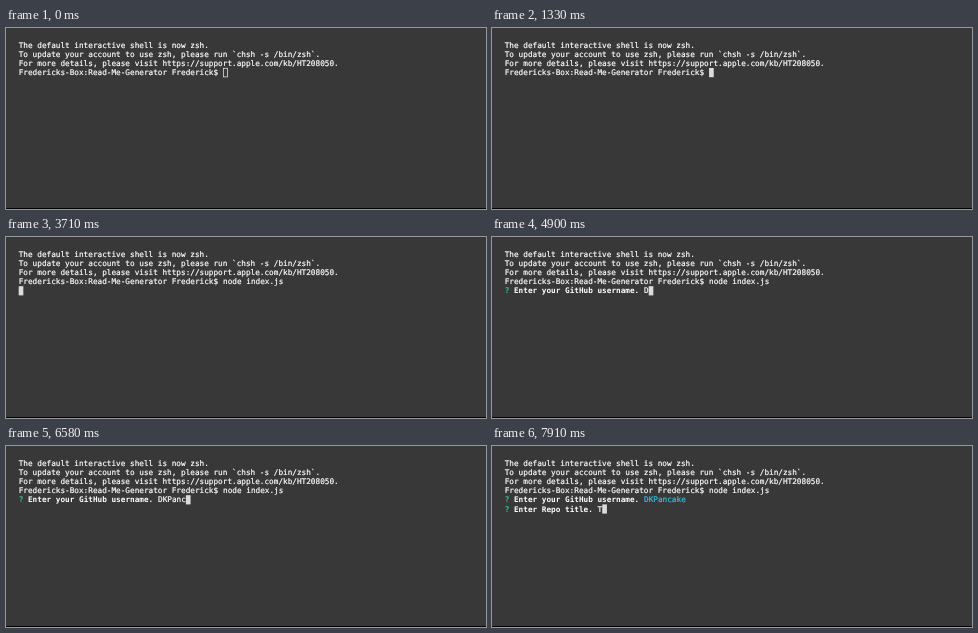
Animation of 480 by 181 pixels, one loop 8 s. Source, as an HTML page:

```html
<!DOCTYPE html>
<html lang="en">
<head>
<meta charset="utf-8">
<title>Terminal session</title>
<style>
  html, body { margin: 0; width: 100%; height: 100%; overflow: hidden; background: #383838; }
  svg { display: block; width: 480px; height: 181px; }
  text {
    font: 7.715px "DejaVu Sans Mono", monospace;
    fill: #fff;
    stroke: #fff;
    stroke-width: .2px;
    white-space: pre;
    text-rendering: geometricPrecision;
  }
  .mark { fill: #2cc9a0; stroke: #2cc9a0; }
  .ask { font-weight: bold; stroke: none; }
  .done { fill: #35bfe0; stroke: #35bfe0; }
</style>
</head>
<body>
<svg viewBox="0 0 480 181">
  <rect width="480" height="181" fill="#383838"/>
  <rect y="180" width="480" height="1" fill="#000"/>
  <g id="screen"></g>
  <rect id="cursor" stroke-width=".8"/>
</svg>
<script>
  const LOOP = 8000, LEFT = 12.7, CELL = 4.645, TOP = 19.6, LINE = 9.2;
  const PROMPT = 'Fredericks-Box:Read-Me-Generator Frederick$ ';
  const COMMAND = 'node index.js ';
  const ASK_USER = 'Enter your GitHub username.';
  const ASK_TITLE = 'Enter Repo title.';
  const USER = 'DKPancake';

  const FOCUS = 560, RUN = 3710, SHOW_USER = 4060, SUBMIT = 7280, SHOW_TITLE = 7350;
  // Key times; the last command key completes the file name.
  const commandKeys = [1400, 1470, 1540, 1820, 2800, 2940, 3010, 3080, 3290];
  const userKeys = [4900, 5250, 5670, 6090, 6300, 6580, 6720, 6930, 7070];
  const titleKeys = [7910];

  const svgNode = (name, parent) =>
    parent.appendChild(document.createElementNS('http://www.w3.org/2000/svg', name));
  const screen = document.getElementById('screen');
  const cursor = document.getElementById('cursor');

  function addText(row, col, content = '', style = '') {
    const node = svgNode('text', screen);
    node.setAttribute('x', LEFT + col * CELL);
    node.setAttribute('y', TOP + row * LINE);
    node.setAttribute('class', style);
    node.textContent = content;
    return node;
  }

  function addQuestion(row, question) {
    return [addText(row, 0, '?', 'mark'), addText(row, 2, question, 'ask')];
  }

  [
    'The default interactive shell is now zsh.',
    'To update your account to use zsh, please run `chsh -s /bin/zsh`.',
    'For more details, please visit https://support.apple.com/kb/HT208050.',
    PROMPT
  ].forEach((line, row) => addText(row, 0, line));

  const userCol = ASK_USER.length + 3, titleCol = ASK_TITLE.length + 3;
  const command = addText(3, PROMPT.length);
  const userQuestion = addQuestion(4, ASK_USER);
  const user = addText(4, userCol);
  const titleQuestion = addQuestion(5, ASK_TITLE);
  const title = addText(5, titleCol);

  const pressed = (keys, t) => keys.filter(k => k <= t).length;
  const show = (nodes, on) =>
    nodes.forEach(n => n.setAttribute('visibility', on ? 'visible' : 'hidden'));

  function cursorCell(t, typed) {
    if (t < RUN) return [3, PROMPT.length + typed.command];
    if (t < SHOW_USER) return [4, 0];
    if (t < SUBMIT) return [4, userCol + typed.user];
    if (t < SHOW_TITLE) return [5, 0];
    return [5, titleCol + typed.title];
  }

  function drawCursor(row, col, solid) {
    const inset = solid ? 0 : 0.3;
    cursor.setAttribute('x', LEFT + col * CELL + inset);
    cursor.setAttribute('y', TOP + row * LINE - 7.2 + inset);
    cursor.setAttribute('width', CELL - 2 * inset);
    cursor.setAttribute('height', LINE - 2 * inset);
    cursor.setAttribute('fill', solid ? '#dcdcdc' : 'none');
    cursor.setAttribute('stroke', solid ? 'none' : '#dcdcdc');
  }

  function draw(t) {
    const keys = pressed(commandKeys, t);
    const typed = {
      command: keys === commandKeys.length ? COMMAND.length : keys,
      user: pressed(userKeys, t),
      title: pressed(titleKeys, t)
    };
    command.textContent = COMMAND.slice(0, typed.command);
    user.textContent = USER.slice(0, typed.user);
    user.setAttribute('class', t >= SUBMIT ? 'done' : '');
    title.textContent = 'T'.slice(0, typed.title);
    show(userQuestion, t >= SHOW_USER);
    show(titleQuestion, t >= SHOW_TITLE);
    drawCursor(...cursorCell(t, typed), t >= FOCUS);
  }

  const start = performance.now();
  function tick() {
    draw((performance.now() - start) % LOOP);
    requestAnimationFrame(tick);
  }
  tick();
</script>
</body>
</html>
```
